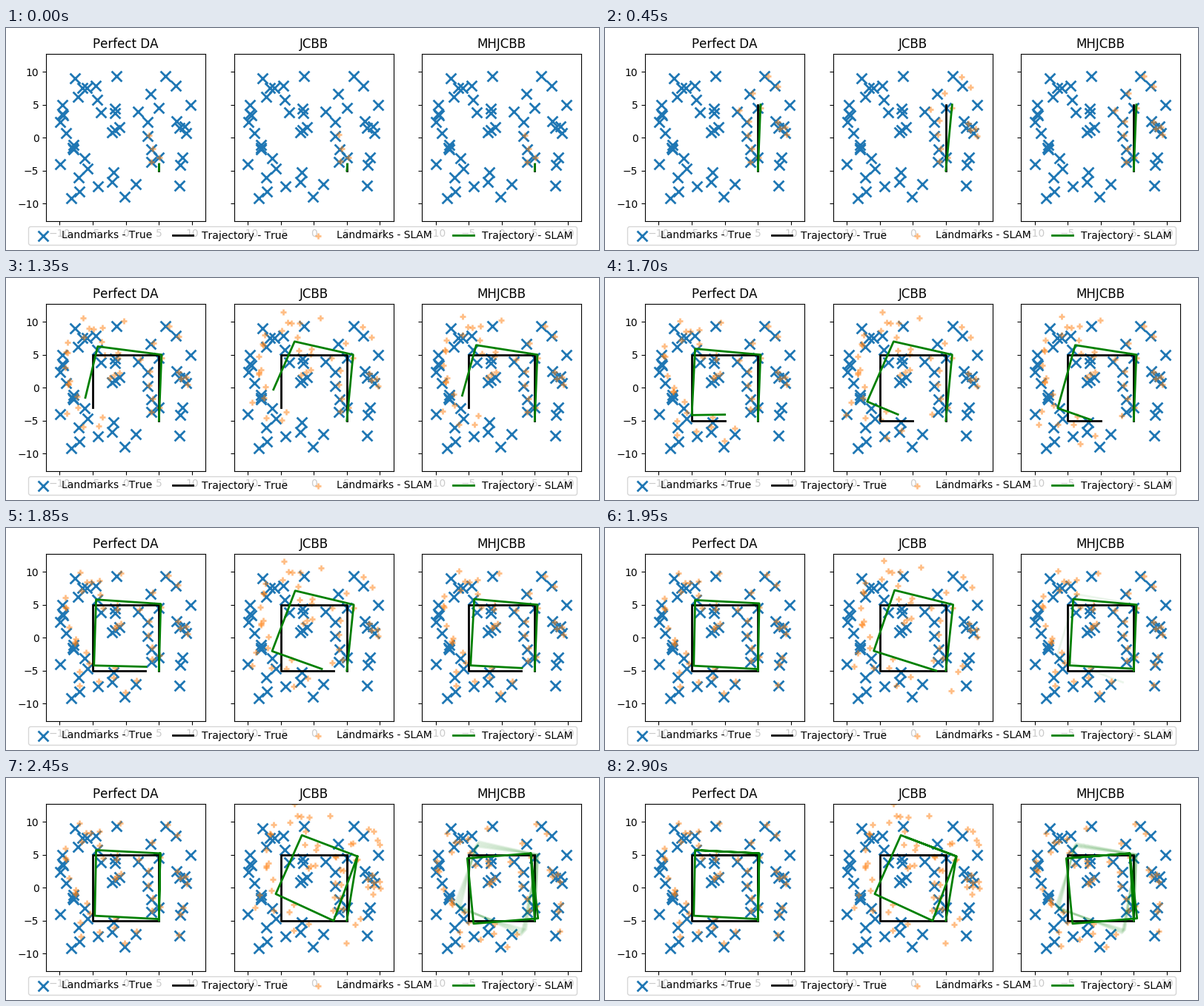
A matplotlib script for the animation above (2950 ms loop, 800 by 300 pixels).

```python
import numpy as np
import matplotlib.pyplot as plt
from matplotlib.animation import FuncAnimation

W, H, SCALE = 800, 300, 8.92           # stage size, pixels per map unit
BOTTOM, TOP, ORIGIN = 261, 34.9, 148.25
LEFT, PITCH, WIDTH = 54.1, 253.5, 215.2
FRAMES, SIDE, LAP = 59, 10, 40
SENSOR_RANGE, HALF_FOV = 5.0, np.radians(60.6)

plt.rcParams["text.kerning_factor"] = 6

np.random.seed(1)
xy = np.random.uniform(-10, 10, (50, 2))
landmarks = xy[:, 0] + 1j * xy[:, 1]

# True trajectory: a square driven one unit per step
steps = np.arange(FRAMES + 1)
side = np.maximum((steps - 1) // SIDE, 0)
heading = 1j ** (side + 1)
truth = (5 - 5j) * 1j ** side + heading * (steps - SIDE * side)

# What the sensor sees from each step, in the robot's own frame
rel = (landmarks - truth[:, None]) / heading[:, None]
seen = (np.abs(rel) < SENSOR_RANGE) & (np.abs(np.angle(rel)) < HALF_FOV)


def drift(*corners):
    """Errors at the start, the four corners, and the corners of the second lap."""
    return np.array([0, *corners, *corners[:2]])


open1 = drift(.4, .75 + 1.25j, -1.6 + 1.55j, -1.3 - 1.5j)
closed1 = drift(.4, .5 + .9j, .85j, 1j)
final1 = drift(.2 + .2j, .5 + .7j, .3 + .75j, .25j)

open2 = drift(.95, 2.1 + 2j, -1.9 + 2.9j, -2.6 - 1j)
late2 = drift(1.1, 2.25 + 2.2j, -.9 + 3j, -1.45)
final2 = drift(1.6 - .25j, 3.2 + 2.95j, -.75 + 4.05j, -2)

open3 = drift(.4, 1.15 + 1.45j, -1.5 + 1.9j, -1.5 - 1.6j)
closed3 = drift(.4, .85 + .85j, .3 + .8j, .3j)
final3 = drift(-.6 + .2j, -.2 - .55j, .75 - .45j, .5 + .35j)

# Per panel: (first step, drift there, drift five steps later)
STAGES = [
    [(0, open1, open1), (35, closed1, final1)],
    [(0, open2, open2), (35, open2, late2), (43, final2, final2)],
    [(0, open3, open3), (38, closed3, closed3), (43, final3, final3)],
]


def drift_at(panel, u):
    start, a, b = [s for s in STAGES[panel] if s[0] <= u][-1]
    return a + (b - a) * min((u - start) / 5, 1)


def path(err):
    return truth + np.interp(steps, SIDE * np.arange(len(err)), err)


def mapped(err, first, last):
    """Landmarks as placed by the estimated poses, averaged over the given steps."""
    turn = 1 + np.diff(err)[side] / SIDE / heading
    pose = heading * turn / np.abs(turn)
    use = slice(first, last + 1)
    placed = path(err)[use, None] + rel[use] * pose[use, None]
    count = seen[use].sum(axis=0)
    total = (placed * seen[use]).sum(axis=0)
    return total[count > 0] / count[count > 0]


def ghost_scales(u):
    if u < 39:
        return []
    if u < 42:
        return [1.1]
    k = np.clip((u - 45) / 14, 0, 1)
    return np.linspace(.85, 1.5 - .3 * k, 6)


def put(line, z):
    line.set_data(z.real, z.imag)


fig = plt.figure(figsize=(W / 100, H / 100), dpi=100)
panels = []
for i, title in enumerate(("Perfect DA", "JCBB", "MHJCBB")):
    ax = fig.add_axes([(LEFT + i * PITCH) / W, 1 - BOTTOM / H,
                       WIDTH / W, (BOTTOM - TOP) / H])
    ax.set_title(title)
    cross = ax.scatter(landmarks.real, landmarks.imag, s=100, marker="x",
                       c="C0", linewidths=2, label="Landmarks - True")
    plus = ax.scatter([], [], s=36, marker="+", c="C1", alpha=.5,
                      linewidths=2, label="Landmarks - SLAM")
    black, = ax.plot([], [], "k", lw=2, label="Trajectory - True")
    ghosts = [ax.plot([], [], "g", lw=2, alpha=.08)[0] for _ in range(6 * (i == 2))]
    green, = ax.plot([], [], "g", lw=2, label="Trajectory - SLAM")
    ax.set_xlim(-WIDTH / 2 / SCALE, WIDTH / 2 / SCALE)
    ax.set_ylim((ORIGIN - BOTTOM) / SCALE, (ORIGIN - TOP) / SCALE)
    ax.set_xticks(range(-10, 11, 5))
    ax.set_yticks(range(-10, 11, 5))
    ax.tick_params(labelleft=i == 0)
    panels.append((plus, black, green, ghosts))

fig.legend(handles=[cross, black, plus, green], loc="lower center", ncol=4)


def draw(n):
    u = n + 1
    for i, (plus, black, green, ghosts) in enumerate(panels):
        err = drift_at(i, u)
        put(black, truth[:u + 1])
        put(green, path(err)[:u + 1])
        marks = mapped(err, 0, min(u, LAP))
        if i == 1 and u > LAP:   # wrong matches add copies on the second lap
            marks = np.append(marks, mapped(err, LAP + 1, min(u, LAP + SIDE)))
        plus.set_offsets(np.column_stack([marks.real, marks.imag]))
        for line in ghosts:
            put(line, truth[:0])
        for line, scale in zip(ghosts, ghost_scales(u)):
            put(line, path(open3 * scale)[:u + 1])


anim = FuncAnimation(fig, draw, frames=FRAMES, interval=50, repeat=True, repeat_delay=0)
plt.show()
```
